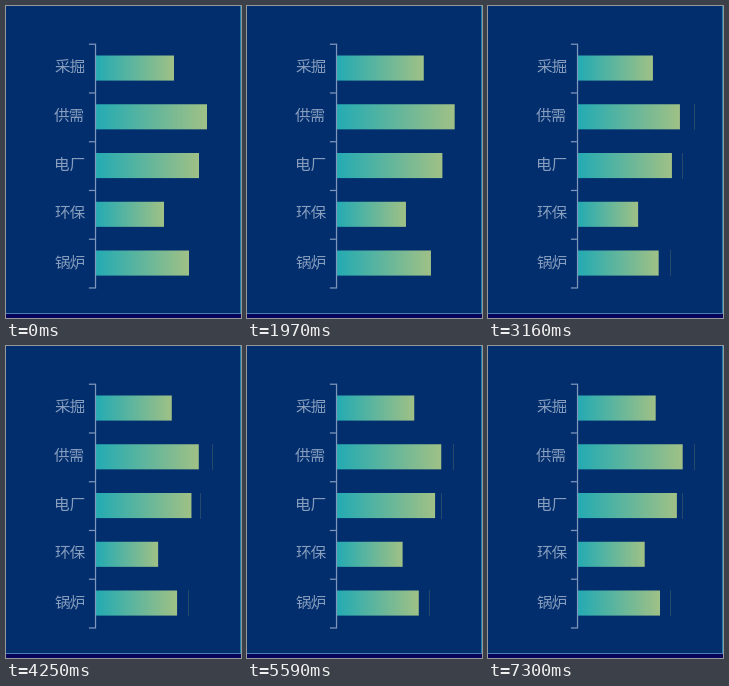
Animation, 235 px wide and 312 px high, one loop 7.32 s. Source, as a matplotlib script:

```python
import numpy as np
import matplotlib.pyplot as plt
from matplotlib.animation import FuncAnimation
from matplotlib.patches import Rectangle

W, H, DPI = 235, 312, 100
LOOP, STEP = 7320, 20
DELAY, PERIOD, EASE_MS = 15, 752, 740
BG, AXIS, LABEL = "#022e6e", "#7f97bb", "#869dbd"
LEFT, RIGHT = np.array([36, 171, 179]) / 255, np.array([160, 193, 134]) / 255
X0, Y0, PITCH, BAR_H = 90, 49.5, 48.75, 25.1
RESCALE = 4  # update at which the value axis widens and the bars shrink

# Bar ends: at first, before the rescale, after it, at last
BARS = {
    "采掘": (168, 177.2, 164.8, 167.7),
    "供需": (201, 208, 191.8, 194.7),
    "电厂": (193, 195.5, 183.7, 188.9),
    "环保": (158, 159, 149.8, 156.7),
    "锅炉": (183, 184, 170.6, 172),
}
FIRST, PEAK, LOW, LAST = np.array(list(BARS.values())).T
TOPS = Y0 + PITCH * np.arange(len(BARS))

fig = plt.figure(figsize=(W / DPI, H / DPI), dpi=DPI, facecolor=BG)
ax = fig.add_axes([0, 0, 1, 1])
ax.axis("off")


def rect(x, y, w, h, color, smooth=False, z=1):
    patch = Rectangle((x, y), w, h, facecolor=color, lw=0,
                      antialiased=smooth, snap=False, zorder=z)
    return ax.add_patch(patch)


rect(0, 307, W, 1, "#4a7fb4")
rect(0, 308, W, 4, "#07045a")
rect(234, 0, 1, 307, "#1e80a8")

# Thin marks stay where the long bars ended
trails = [rect(int(PEAK[i] - 1.5), TOPS[i], 1, BAR_H, "#26496a", z=2)
          for i in (1, 2, 4)]
canvas = np.zeros((H, W, 4))
bars = ax.imshow(canvas, extent=(0, W, H, 0), interpolation="nearest",
                 aspect="auto", zorder=3)
ax.set(xlim=(0, W), ylim=(H, 0))

rect(88.9, 37.6, 1.25, 5 * PITCH + 1.25, AXIS, smooth=True, z=4)
for i in range(6):
    rect(82.9, 37.6 + PITCH * i, 6, 1.25, AXIS, smooth=True, z=4)
for name, top in zip(BARS, TOPS):
    ax.text(63.8, top + 16.6, name, family="Noto Sans CJK JP", color=LABEL,
            size=15.6 * 72 / DPI, ha="center", va="baseline")


def ends_after(k):
    """Bar ends once k updates are done."""
    if k < RESCALE:
        return FIRST + (PEAK - FIRST) * (k / (RESCALE - 1)) ** 3
    u = min((k - RESCALE) / 5, 1)
    return LOW + (LAST - LOW) * u * u * (3 - 2 * u)


def bar_ends(t):
    k, since = divmod(max(t - DELAY, 0), PERIOD)
    p = min(since / EASE_MS, 1)
    old, new = ends_after(k), ends_after(k + 1)
    return old + (new - old) * (1 - (1 - p) ** 3)


def cover(n, lo, hi):
    """Share of each unit pixel that lies between lo and hi."""
    px = np.arange(n)
    return np.clip(np.minimum(px + 1, hi) - np.maximum(px, lo), 0, 1)


def draw(frame):
    t = frame * STEP
    canvas[:] = 0
    for top, end in zip(TOPS, bar_ends(t)):
        rows = slice(int(top), int(top + BAR_H) + 1)
        mix = np.clip((np.arange(W) + 0.5 - X0) / (end - X0), 0, 1)[:, None]
        canvas[rows, :, :3] = LEFT + (RIGHT - LEFT) * mix
        alpha = np.outer(cover(H, top, top + BAR_H), cover(W, X0, end))
        canvas[rows, :, 3] = alpha[rows]
    bars.set_data(canvas)
    for trail in trails:
        trail.set_visible(t > DELAY + PERIOD * (RESCALE - 1))
    return [bars, *trails]


anim = FuncAnimation(fig, draw, frames=LOOP // STEP, interval=STEP,
                     repeat=True, repeat_delay=0)
plt.show()
```
